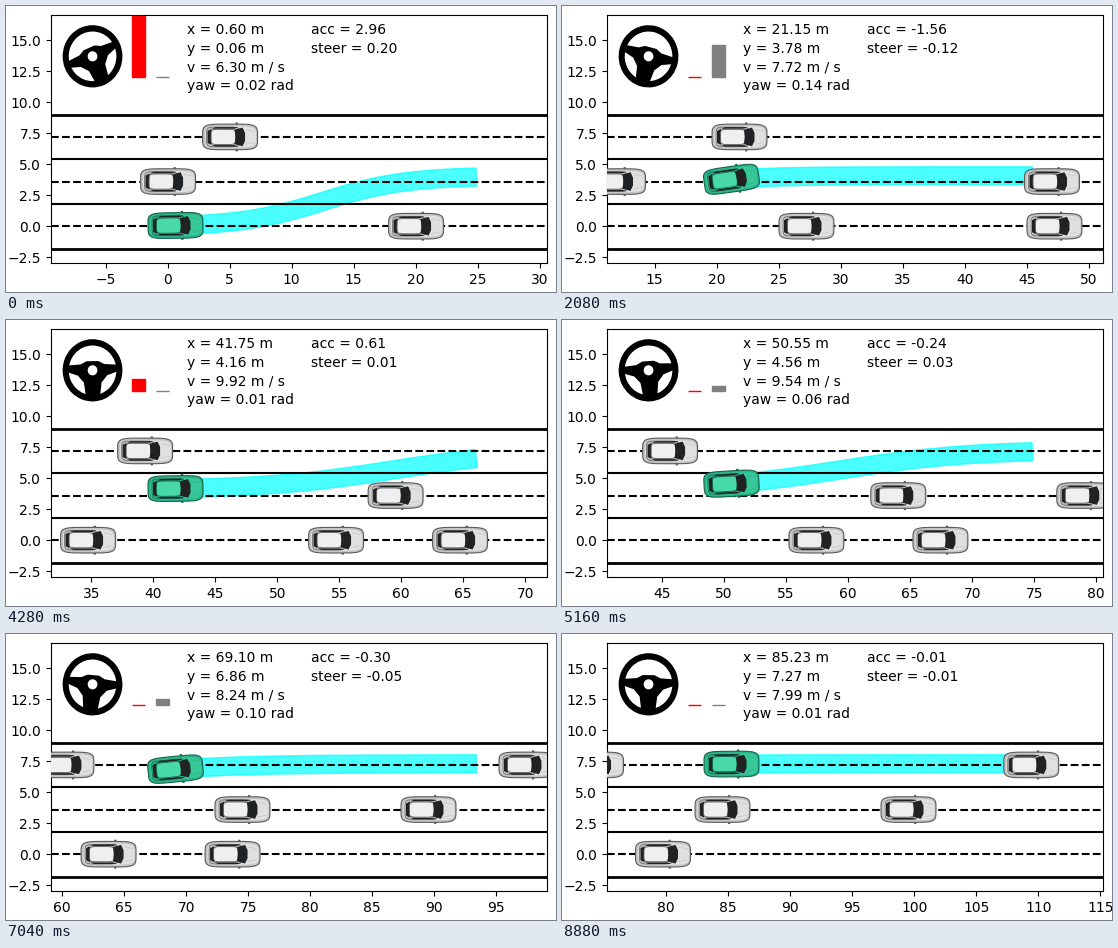
A matplotlib script for the animation above (9880 ms loop, 550 by 286 pixels).

```python
import numpy as np
import matplotlib.pyplot as plt
from matplotlib.animation import FuncAnimation
from matplotlib.collections import PolyCollection
from matplotlib.patches import Circle, Polygon, Rectangle, Wedge
from matplotlib.ticker import MultipleLocator
from matplotlib.transforms import Affine2D

W, H, DPI = 550, 286, 100
PX = 12.4                        # pixels per metre
TICK, LOOP, STEPS = 40, 9880, 100
DT, WHEELBASE, LANE = 0.1, 4.0, 3.6
REAR = 2.4                       # heading follows the path this far back
HORIZON, REPLAN = 24.3, 46       # planned metres, step of the second plan

# throttle and brake over time (s), linear in between
PEDAL_T = [0, .7, 1.2, 2.2, 3.2, 4, 4.5, 5.3, 5.9, 6.5, 7.2, 8, 8.8, 10]
PEDAL_A = [2.96, 2.6, 1.2, -2.84, 1.44, -.05, 3.1, -.89, -.24, -.86, -.73,
           -.3, -.13, -.01]

# lane, speed, start positions
FLEETS = [(0, 3, (20, 40, 50)), (1, 5, (0, 35, 50)), (2, 7, (5,)),
          (2, 6, (50,))]


def logistic(x, center, width):
    return 1 / (1 + np.exp((center - x) / width))


def route(x, second=True):
    """Lateral position along the two lane changes."""
    y = 4.11 * logistic(x, 12.55, 3.3) - 0.05
    return y + 3.23 * logistic(x, 59.4, 5.2) * second


def heading(x, h=0.01):
    x = x - REAR
    return np.arctan((route(x + h) - route(x - h)) / (2 * h))


def simulate():
    t = np.arange(STEPS + 1) * DT
    acc = np.interp(t, PEDAL_T, PEDAL_A)
    x, v, states = 0.60, 6.30, []
    for step, a in enumerate(acc):
        yaw = heading(x)
        bend = (heading(x + 0.1) - heading(x - 0.1)) / 0.2
        steer = np.arctan(WHEELBASE * bend) + 0.18 * 0.5**step
        states.append((x, route(x), v, yaw, a, steer))
        x += v * np.cos(yaw) * DT
        v += (a + acc[min(step + 1, STEPS)]) / 2 * DT
    return states


STATES = simulate()


def step_at(ms):
    """Playback runs a little unevenly between these moments."""
    return int(round(np.interp(ms, [0, 920, 3360, 5160, 8880],
                               [0, 12, 40, 59, STEPS])))


def plan_band(step, x, half=0.73):
    px = np.linspace(x, x + HORIZON, 60)
    py = route(px, second=step >= REPLAN)
    angle = np.arctan(np.gradient(py, px))
    off = half * np.array([-np.sin(angle), np.cos(angle)])
    mid = np.array([px, py])
    return np.concatenate([mid + off, (mid - off)[:, ::-1]], axis=1).T


def rounded(left, right, ry, power=5.0, n=48):
    a = np.linspace(0, 2 * np.pi, n, endpoint=False)
    c, s = np.cos(a), np.sin(a)
    return np.c_[(left + right) / 2
                 + (right - left) / 2 * np.sign(c) * abs(c)**(2 / power),
                 ry * np.sign(s) * abs(s)**(2 / power)]


def pair(points):
    p = np.array(points, float)
    return [p, p * (1, -1)]


def closed(points):
    """Outline symmetric about the x axis from its upper half."""
    upper, lower = pair(points)
    return [np.concatenate([upper, lower[::-1]])]


WHITE = dict(body="#c4c4c4", shine="#e0e0e0", roof="#efefef", edge="#5c5c5c")
GREEN = dict(body="#2bb487", shine="#36c899", roof="#48d9a8", edge="#17644d")


class Car:
    def __init__(self, ax, paint, zorder):
        body, edge, glass = paint["body"], paint["edge"], "#202224"
        parts = [
            (pair([(6, 12), (9, 12), (8, 14.6), (6, 14.4)]), edge, 0),
            ([rounded(-27, 28, 12.8)], body, 0.8),
            ([rounded(-24.5, 26.5, 10.6)], paint["shine"], 0),
            ([rounded(-23, 10, 9.9, 6)], body, 0.5),
            (pair([(-18, 8.2), (-14, 9.8), (9, 9.8), (5, 8.2)]), glass, 0),
            (closed([(-22, 6), (-18, 8)]), glass, 0),
            ([rounded(-18.5, 6, 7.6, 6)], paint["roof"], 0.6),
            (closed([(6, 0), (5, 7.2), (13, 9.3), (15.5, 4)]), glass, 0),
            (pair([(16, 7), (25, 5.2), (25, 5.8), (16, 7.7)]), body, 0),
        ]
        flat = [(p, face, lw) for polys, face, lw in parts for p in polys]
        polys, faces, widths = zip(*flat)
        edges = [edge if lw else "none" for lw in widths]
        self.ax = ax
        self.art = PolyCollection(polys, facecolors=faces, edgecolors=edges,
                                  linewidths=widths, zorder=zorder)
        ax.add_collection(self.art, autolim=False)

    def place(self, x, y, yaw=0.0):
        pose = Affine2D().scale(1 / PX).rotate(yaw).translate(x, y)
        self.art.set_transform(pose + self.ax.transData)
        left, right = self.ax.get_xlim()
        self.art.set_visible(left - 3 < x < right + 3)


fig = plt.figure(figsize=(W / DPI, H / DPI), dpi=DPI, facecolor="white")
ax = fig.add_axes([45 / W, 0.1, 40 * PX / W, 20 * PX / H])
ax.set_ylim(-3, 17)
ax.xaxis.set_major_locator(MultipleLocator(5))
ax.yaxis.set_major_locator(MultipleLocator(2.5))

for i in range(4):
    ax.axhline(LANE * (i - 0.5), color="black", lw=2 if i in (0, 3) else 1.5)
for i in range(3):
    ax.axhline(LANE * i, color="black", ls="--", lw=1.5)

band = Polygon(np.zeros((3, 2)), fc="cyan", ec="cyan", alpha=0.7, zorder=1)
ax.add_patch(band)
traffic = [(Car(ax, WHITE, 4), x0, LANE * lane, speed)
           for lane, speed, starts in FLEETS for x0 in starts]
ego = Car(ax, GREEN, 5)

# dashboard coordinates: metres relative to the ego car's x
dash = Affine2D().translate(10, 3).scale(1 / 40, 1 / 20) + ax.transAxes


def on_dash(patch):
    patch.set_transform(dash)
    patch.set_zorder(6)
    ax.add_artist(patch)
    patch.set_clip_path(ax.patch)
    return patch


def gauge(x, color):
    return on_dash(Rectangle((x - 0.5, 12), 1, 0, fc=color, ec=color, lw=1))


def label(x, y):
    return ax.text(x, y, "", transform=dash, fontsize=10, zorder=7)


# drawn with the bottom spoke along -x, then turned upright
spokes = closed([(9, 6), (6, 12), (5, 27), (-1, 27), (-5, 15), (-12, 9),
                 (-27, 7)])[0] / PX
wheel = [on_dash(p) for p in (
    Wedge((0, 0), 2.46, 0, 360, width=0.5, fc="black", lw=0),
    Polygon(spokes, fc="black", lw=0),
    Circle((0, 0), 0.4, fc="white", lw=0))]
gas, brake = gauge(-2.95, "red"), gauge(-1, "gray")

FORMS = ["x = {:.2f} m", "y = {:.2f} m", "v = {:.2f} m / s",
         "yaw = {:.2f} rad", "acc = {:.2f}", "steer = {:.2f}"]
readouts = [(label(1 + 10 * (i // 4), 15.5 - 1.5 * (i % 4)), form)
            for i, form in enumerate(FORMS)]


def draw(frame):
    step = step_at(frame * TICK)
    state = STATES[step]
    x, y, v, yaw, acc, steer = state

    ax.set_xlim(x - 10, x + 30)
    band.set_xy(plan_band(step, x))
    ego.place(x, y, yaw)
    elapsed = max(step - 1, 0) * DT
    for car, x0, lane_y, speed in traffic:
        car.place(x0 + speed * elapsed, lane_y)

    turn = Affine2D().rotate(np.pi / 2 + 2 * steer)
    turn.scale(0.98, 1.02).translate(-6.65, 13.7)
    for part in wheel:
        part.set_transform(turn + dash)
    gas.set_height(max(acc, 0) * 5 / 3)
    brake.set_height(max(-acc, 0) * 5 / 3)
    for (text, form), value in zip(readouts, state):
        text.set_text(form.format(value))
    return []


anim = FuncAnimation(fig, draw, frames=LOOP // TICK, interval=TICK,
                     init_func=lambda: [], repeat=True, repeat_delay=0)
plt.show()
```
